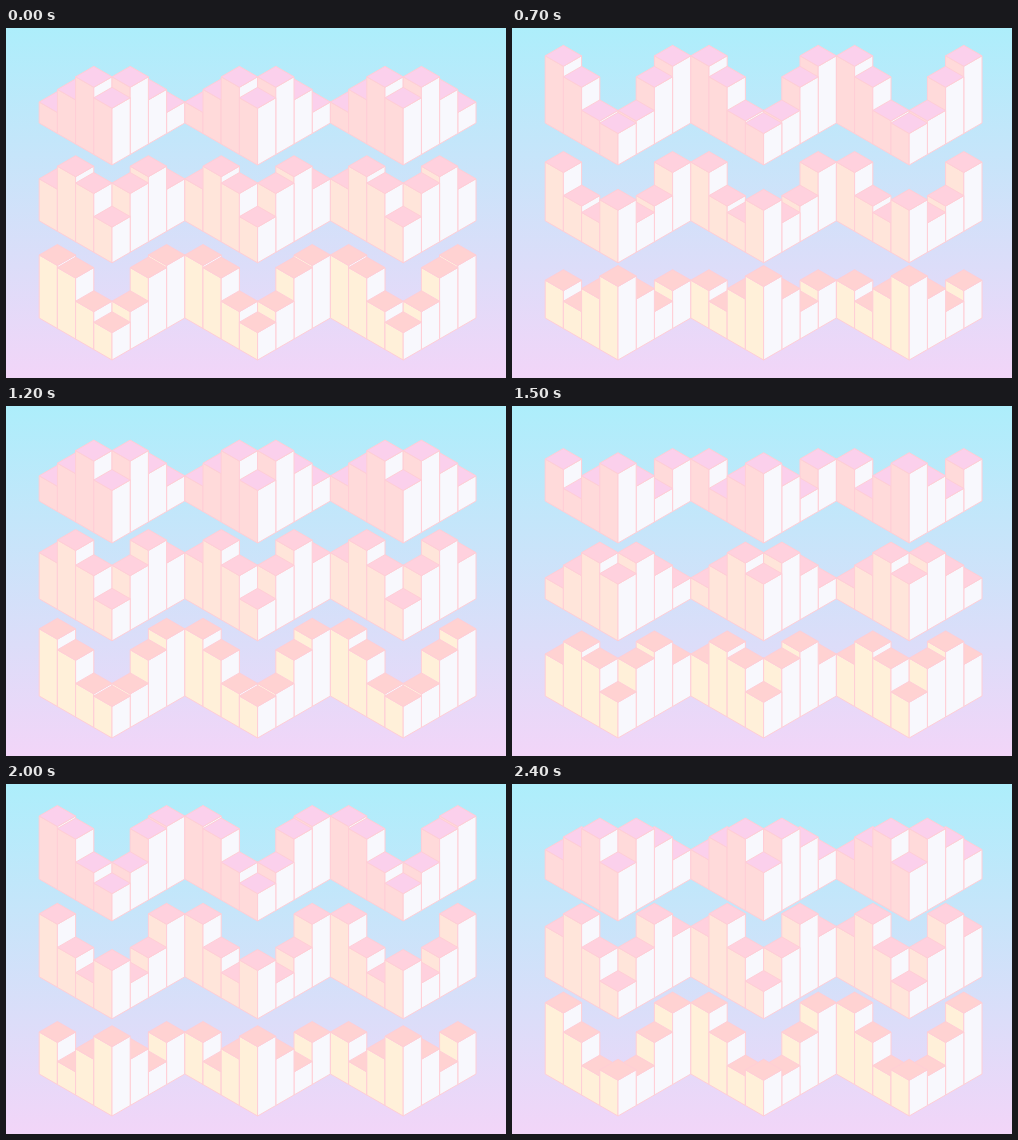
Recreate the animation shown at these times as an HTML page with a canvas. Size 500x350 px, loop 2.5 s.

```html
<!DOCTYPE html>
<html lang="en">
<head>
<meta charset="utf-8">
<title>Pastel bars</title>
<style>
  html, body { margin: 0; width: 100%; height: 100%; overflow: hidden; }
  body { background: #f2d5f8; }
  canvas { display: block; width: 500px; height: 350px; }
</style>
</head>
<body>
<canvas id="stage" width="500" height="350"></canvas>
<script>
const ctx = document.getElementById('stage').getContext('2d');

const HALF_W = 18.2, HALF_H = 10.5;   // half size of a bar's top diamond
const LOW = 21, HIGH = 73.5;          // bar height range
const PERIOD = 1250, ROW_DELAY = 250, BAR_LEAD = 275, FIRST_PEAK = 200;
const LOOP = 2500, STEP = 100;
const CENTERS = [-1, 0, 1].map(i => 251.6 + i * 8 * HALF_W);
const ROWS = [
  { base: 137,   top: '#fbd0ec', left: '#ffdada' },
  { base: 234.8, top: '#ffd1de', left: '#ffe5da' },
  { base: 332,   top: '#ffd2d2', left: '#fff0d9' }
];
const RIGHT = '#f8f8fd', LINE = '#ffced6';

const sky = ctx.createLinearGradient(0, 0, 0, 350);
sky.addColorStop(0, '#adeefb');
sky.addColorStop(1, '#f2d5f8');

// Triangle wave: linear rise and fall, peaking at a time set by row and bar.
function barHeight(t, row, k) {
  const peak = FIRST_PEAK + row * ROW_DELAY - k * BAR_LEAD;
  const phase = (((t - peak) % PERIOD) + PERIOD) % PERIOD;
  const away = Math.min(phase, PERIOD - phase) / (PERIOD / 2);
  return HIGH - (HIGH - LOW) * away;
}

function face(color, points) {
  ctx.beginPath();
  points.forEach(([x, y]) => ctx.lineTo(x, y));
  ctx.closePath();
  ctx.fillStyle = color;
  ctx.fill();
  ctx.stroke();
}

function bar(x, ground, height, colors) {
  const y = ground - height;
  const l = x - HALF_W, r = x + HALF_W;
  face(colors.left, [[l, y - HALF_H], [x, y], [x, ground], [l, ground - HALF_H]]);
  face(RIGHT, [[x, y], [r, y - HALF_H], [r, ground - HALF_H], [x, ground]]);
  face(colors.top, [[x, y], [r, y - HALF_H], [x, y - 2 * HALF_H], [l, y - HALF_H]]);
}

function draw(t) {
  ctx.fillStyle = sky;
  ctx.fillRect(0, 0, 500, 350);
  ctx.strokeStyle = LINE;
  ctx.lineWidth = 1;
  ctx.lineJoin = 'round';
  ROWS.forEach((colors, row) => {
    for (let k = 3; k >= 0; k--) {
      const height = barHeight(t, row, k);
      const ground = colors.base - k * HALF_H;
      for (const cx of CENTERS) {
        bar(cx - k * HALF_W, ground, height, colors);
        if (k) bar(cx + k * HALF_W, ground, height, colors);
      }
    }
  });
}

const start = performance.now();
let shown = -1;
function tick() {
  const t = (performance.now() - start) % LOOP;
  const step = Math.floor(t / STEP) * STEP;
  if (step !== shown) draw(shown = step);
  requestAnimationFrame(tick);
}
tick();
</script>
</body>
</html>
```
